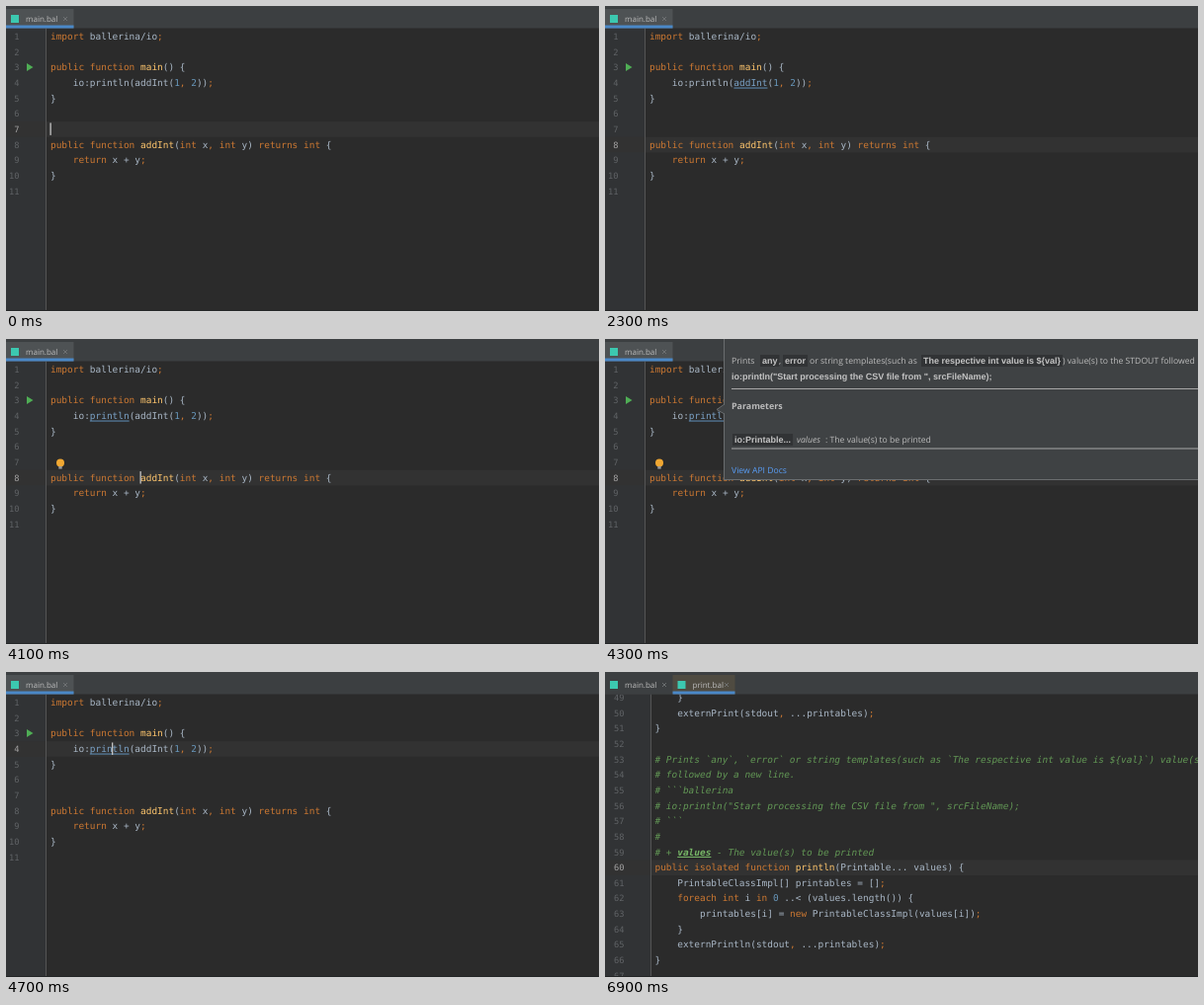
Recreate the animation shown at these times as an HTML page with a canvas. Size 600x309 px, loop 7 s.

```html
<!DOCTYPE html>
<html lang="en">
<head>
<meta charset="utf-8">
<title>Go to definition</title>
<style>
html, body { margin: 0; height: 100%; overflow: hidden; background: #2b2b2b; }
canvas { display: block; width: 100vw; height: 100vh; }
</style>
</head>
<body>
<canvas></canvas>
<script>
const W = 600, H = 309, LOOP = 7000;
const CHAR = 5.69, ROW = 15.65;
const MONO = '"DejaVu Sans Mono", monospace';
const UI = '"Open Sans", sans-serif';
const BOLD = 'bold 9px "Liberation Sans", sans-serif';
const COLOR = {
  text: '#a9b7c6', keyword: '#cc7832', number: '#6897bb', name: '#ffc66d',
  doc: '#629755', link: '#7ba3c8', ui: '#bbbbbb'
};
const KEYWORDS = new Set('import public function int returns return isolated foreach in new'.split(' '));

const mainFile = {
  first: 1, top: 31, left: 45, gutter: 40,
  lines: `import ballerina/io;

public function main() {
    io:println(addInt(1, 2));
}


public function addInt(int x, int y) returns int {
    return x + y;
}
`.split('\n')
};
const printFile = {
  first: 49, top: 26, left: 50.5, gutter: 46,
  lines: `    }
    externPrint(stdout, ...printables);
}

# Prints \`any\`, \`error\` or string templates(such as \`The respective int value is \${val}\`) value(s) to the STDOUT
# followed by a new line.
# \`\`\`ballerina
# io:println("Start processing the CSV file from ", srcFileName);
# \`\`\`
#
# + values - The value(s) to be printed
public isolated function println(Printable... values) {
    PrintableClassImpl[] printables = [];
    foreach int i in 0 ..< (values.length()) {
        printables[i] = new PrintableClassImpl(values[i]);
    }
    externPrintln(stdout, ...printables);
}
`.split('\n')
};

const canvas = document.querySelector('canvas');
const dpr = window.devicePixelRatio || 1;
canvas.width = W * dpr;
canvas.height = H * dpr;
const ctx = canvas.getContext('2d');
ctx.scale(dpr, dpr);
ctx.textRendering = 'geometricPrecision';

function rect(x, y, w, h, color) {
  ctx.fillStyle = color;
  ctx.fillRect(x, y, w, h);
}

function text(str, x, y, font, color, align = 'left') {
  ctx.font = font;
  ctx.fillStyle = color;
  ctx.textAlign = align;
  ctx.fillText(str, x, y);
}

function shape(points, color) {
  ctx.fillStyle = color;
  ctx.beginPath();
  points.forEach(([x, y]) => ctx.lineTo(x, y));
  ctx.fill();
}

function stroke(x1, y1, x2, y2, color, width = 1) {
  ctx.strokeStyle = color;
  ctx.lineWidth = width;
  ctx.beginPath();
  ctx.moveTo(x1, y1);
  ctx.lineTo(x2, y2);
  ctx.stroke();
}

const rowY = (file, line) => file.top + (line - file.first) * ROW;

function drawCode(line, x, y, link) {
  const font = `9.45px ${MONO}`;
  if (line.startsWith('#')) {
    const marked = line.startsWith('# + ');
    text(marked ? '# +' : line, x, y, 'italic ' + font, COLOR.doc);
    if (marked) {
      const nameX = x + 4 * CHAR;
      text('values', nameX, y, 'italic bold ' + font, '#77b767');
      rect(nameX, y + 1.5, 6 * CHAR, 1, '#77b767');
      text(line.slice(11), x + 11 * CHAR, y, 'italic ' + font, COLOR.doc);
    }
    return;
  }
  let previous = '';
  for (const { 0: token, index } of line.matchAll(/\w+|[;,]|[^\w;,]+/g)) {
    const tokenX = x + index * CHAR;
    const linked = token === link;
    let color = COLOR.text;
    if (KEYWORDS.has(token) || /^[;,]$/.test(token)) color = COLOR.keyword;
    else if (/^\d+$/.test(token)) color = COLOR.number;
    else if (previous === 'function') color = COLOR.name;
    else if (linked) color = COLOR.link;
    text(token, tokenX, y, font, color);
    if (linked) rect(tokenX, y + 1.6, token.length * CHAR, 1, '#5f8fb8');
    if (token.trim()) previous = token;
  }
}

function drawEditor(file, caret, link) {
  rect(0, 0, W, H, '#2b2b2b');
  rect(0, 0, file.gutter, H, '#313335');
  rect(0, rowY(file, caret.line) - 7.8, W, ROW, '#323232');
  rect(file.gutter, 0, 1, H, '#555555');
  file.lines.forEach((line, i) => {
    const number = file.first + i, y = rowY(file, number) + 3;
    text(number, file.gutter - 26.5, y, `8.7px ${MONO}`,
      number === caret.line ? '#a4a3a3' : '#606366', 'right');
    // Only calls on line 4 can be highlighted as links.
    drawCode(line, file.left, y, file === mainFile && number === 4 ? link : '');
  });
  if (caret.on) {
    rect(file.left + caret.col * CHAR - 0.5, rowY(file, caret.line) - 6.5, 1.2, 12.5, '#d0d0d0');
  }
}

function drawTab(x, width, label, background, active) {
  rect(x, 3, width, 19.5, background);
  if (active) rect(x, 19.5, width, 3, '#4a88c7');
  rect(x + 5, 9, 8, 8, '#3cc8b0');
  text(label, x + 20, 16.3, `8px ${UI}`, COLOR.ui);
  const cross = x + width - 8.5;
  stroke(cross - 2, 11, cross + 2, 15, '#777a7c', 0.8);
  stroke(cross - 2, 15, cross + 2, 11, '#777a7c', 0.8);
}

function drawTabs(second) {
  rect(0, 0, W, 22.5, '#3c3f41');
  drawTab(0, 68.5, 'main.bal', second ? '#3c3f41' : '#4e5254', !second);
  if (second) drawTab(68.5, 63, 'print.bal', '#4f4b41', true);
}

function drawBulb() {
  ctx.fillStyle = '#f0a732';
  ctx.beginPath();
  ctx.arc(55, 125.5, 4, 0, 2 * Math.PI);
  ctx.fill();
  rect(53.3, 129, 3.4, 2.6, '#9a9a9a');
}

function drawPopup() {
  const background = '#3f4244', border = '#6a6d6f', body = `8.65px ${UI}`;
  const chip = (str, x, y) => {
    ctx.font = BOLD;
    rect(x - 2, y - 9, ctx.measureText(str).width + 4, 12, '#313335');
    text(str, x, y, BOLD, '#c4c4c4');
  };
  rect(120, 0, W - 120, 143, border);
  rect(121, 0, W - 121, 142, background);
  shape([[121.5, 66], [113, 71.5], [121.5, 76]], background);
  stroke(121, 66, 113, 71.5, border);
  stroke(113, 71.5, 121, 76, border);

  text('Prints', 128, 25, body, COLOR.ui);
  chip('any', 159, 25);
  text(',', 176, 25, body, COLOR.ui);
  chip('error', 182, 25);
  text('or string templates(such as', 207, 25, body, COLOR.ui);
  chip('The respective int value is ${val}', 322, 25);
  text(') value(s) to the STDOUT followed', 463, 25, body, COLOR.ui);
  text('io:println("Start processing the CSV file from ", srcFileName);', 128, 40.5, BOLD, '#c4c4c4');
  rect(128, 50, W - 128, 1, '#a8a8a8');
  text('Parameters', 128, 70.5, `bold 8.9px ${UI}`, COLOR.ui);
  chip('io:Printable...', 131, 105);
  text('values', 194, 105, 'italic ' + body, COLOR.ui);
  text(': The value(s) to be printed', 223, 105, body, COLOR.ui);
  rect(128, 110.5, W - 128, 1, '#a8a8a8');
  text('View API Docs', 128, 136, body, '#589df6');
}

function drawLoading(t) {
  const step = Math.floor(t / 100);
  for (let i = 0; i < 12; i++) {
    const angle = i * Math.PI / 6, c = Math.cos(angle), s = Math.sin(angle);
    const alpha = 0.08 + 0.22 * ((i - step + 120) % 12) / 11;
    stroke(529 + 5 * c, 266 + 5 * s, 529 + 10 * c, 266 + 10 * s, `rgba(200,200,200,${alpha})`, 2);
  }
  text('Loading...', 529, 291, `7.7px ${UI}`, '#555555', 'center');
}

function caretAt(t) {
  const blink = (line, col, since) => ({ line, col, on: (t - since) % 1000 < 500 });
  if (t < 1700) return blink(7, 0, -100);
  if (t < 1800) return blink(4, 18, 1700);
  if (t < 4400) return blink(8, 16, 1800);
  if (t < 4800) return blink(4, 11, 4400);
  return blink(60, 0, 5000);
}

function draw(t) {
  const second = t >= 4800;
  const link = t < 1100 ? '' : t < 3400 ? 'addInt' : 'println';
  drawEditor(second ? printFile : mainFile, caretAt(t), link);
  drawTabs(second);
  if (!second) {
    shape([[21, 58], [27.5, 62], [21, 66]], '#4fae55');
    if (t >= 3300 && t < 4400) drawBulb();
    if (t >= 4300 && t < 4400) drawPopup();
  } else if (t >= 5000 && t < 5600) {
    drawLoading(t);
  }
  rect(0, 308, W, 1, '#222425');
}

const start = performance.now();
function frame() {
  draw((performance.now() - start) % LOOP);
  requestAnimationFrame(frame);
}
frame();
</script>
</body>
</html>
```
